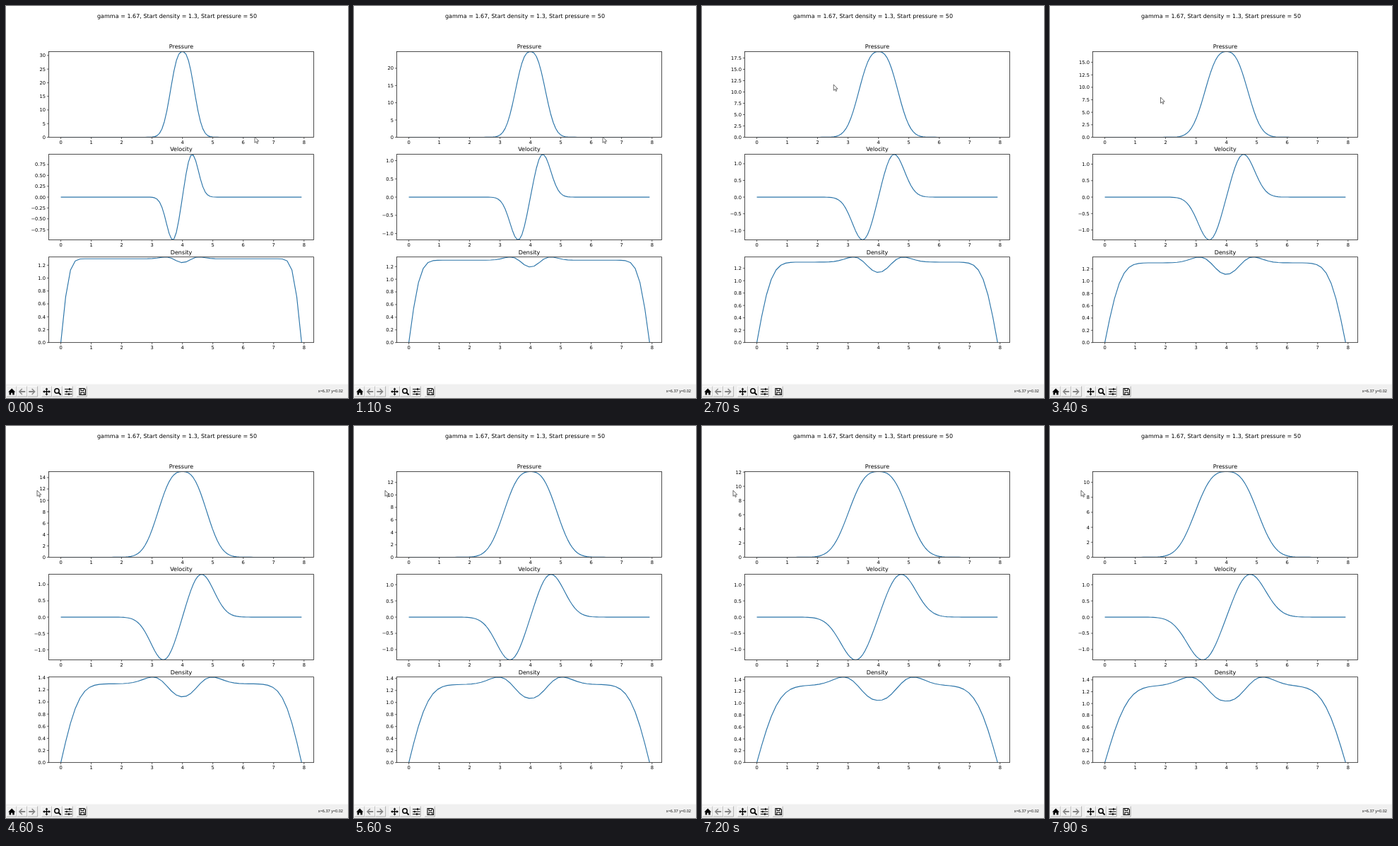
Animation, 484 px wide and 554 px high, one loop 8 s. Source, as an HTML page:

```html
<!DOCTYPE html>
<html lang="en">
<head>
<meta charset="utf-8">
<title>Gas simulation</title>
<style>
  html, body { margin: 0; width: 100%; height: 100%; overflow: hidden; background: #fff; }
  svg { display: block; }
  text { font-family: "DejaVu Sans", sans-serif; font-size: 6.7px; text-rendering: geometricPrecision; }
  .title { font-size: 8.05px; text-anchor: middle; }
  .xt { text-anchor: middle; }
  .yt { text-anchor: end; }
  .frame { fill: none; stroke: #222; stroke-width: .8; }
  .tick { fill: none; stroke: #222; stroke-width: .7; }
  .curve { fill: none; stroke: #2c75a9; stroke-width: 1.15; stroke-linejoin: round; }
  .status { font-family: "Open Sans", sans-serif; font-size: 5.5px; text-anchor: end; }
  .lo { fill: none; stroke: #a0a0a0; stroke-width: .8; }
  .hi { fill: none; stroke: #fff; stroke-width: .8; }
  .line { fill: none; stroke: #000; }
</style>
</head>
<body>
<svg width="484" height="554" viewBox="0 0 484 554">
  <text class="title" x="242" y="17.3">gamma = 1.67, Start density = 1.3, Start pressure = 50</text>
  <g id="plots"></g>
  <g id="bar">
    <rect y="534.5" width="484" height="19.5" fill="#f0f0f0"/>
    <g id="buttons"></g>
    <path d="M3.2 545.4L8.2 540.6L13.2 545.4H11.8V549.6H9.2V546.8H7.2V549.6H4.6V545.4Z"/>
    <g fill="#858585">
      <path id="arrow" d="M17.8 545L22.3 540.4L23.4 541.5L20.8 544.1H27.2V545.9H20.8L23.4 548.5L22.3 549.6Z"/>
      <use href="#arrow" transform="matrix(-1 0 0 1 59.5 0)"/>
    </g>
    <path d="M57.5 539.5L59.5 542H58.2V544.3H60.5V543L63 545L60.5 547V545.7H58.2V548H59.5L57.5 550.5L55.5 548H56.8V545.7H54.5V547L52 545L54.5 543V544.3H56.8V542H55.5Z"/>
    <g class="line">
      <circle cx="72" cy="544" r="3.2" stroke-width="1.5"/>
      <path d="M74.5 546.5L77.6 549.6" stroke-width="2"/>
      <path d="M83 541.5H93.5M83 545H93.5M83 548.5H93.5"/>
      <path d="M90 540.2V542.8M85.8 543.7V546.3M89 547.2V549.8" stroke-width="1.9"/>
      <path d="M104 540.5H110.8L112.5 542.2V549.5H104Z" stroke-width="1.1"/>
      <path d="M106 541V543.5H110V541M106 549V546H110.6V549"/>
    </g>
    <text class="status" x="477" y="546.4">x=6.37 y=0.02</text>
  </g>
  <path id="cursor" d="M0 0V8.3L1.9 6.6L3.2 9.5L4.5 8.9L3.2 6.1H5.8Z" fill="#fff" stroke="#333" stroke-width=".7"/>
</svg>
<script>
const LEFT = 60.5, WIDTH = 375, TOP = 64.5, HEIGHT = 120.95, PITCH = 145.1;
const X0 = 77.6, UNIT = 43.02, END = 7.92, MID = 4;
const NAMES = ["Pressure", "Velocity", "Density"];
const LOOP = 8000, STEP = 100;
const HOLDS = [2, 10, 14, 37, 52, 59];  // ticks on which the simulation stands still
const POINTER = [[11, 352, 185], [17, 216, 93], [31, 156.5, 129], [42, 44, 91]];  // step, x, y

const $ = id => document.getElementById(id);
const px = x => X0 + x * UNIT;
const topOf = name => TOP + PITCH * NAMES.indexOf(name);
const erf = x => Math.tanh(1.12838 * (x + .0895 * x ** 3));

function buildPlots() {
  let out = "";
  for (const name of NAMES) {
    const top = topOf(name), base = top + HEIGHT;
    const box = `x="${LEFT}" y="${top}" width="${WIDTH}" height="${HEIGHT}"`;
    out += `<clipPath id="clip${name}"><rect ${box}/></clipPath>
      <path class="curve" id="line${name}" clip-path="url(#clip${name})"/>
      <g id="ticks${name}"></g>
      <rect class="frame" ${box}/>
      <text class="title" x="248" y="${top - 4.2}">${name}</text>`;
    for (let x = 0; x <= 8; x++)
      out += `<path class="tick" d="M${px(x)} ${base}v2.6"/><text class="xt" x="${px(x)}" y="${base + 9.6}">${x}</text>`;
  }
  $("plots").innerHTML = out;
}

function buildButtons() {
  let out = "";
  for (let i = 0; i < 7; i++) {
    const x = 1 + 14.8 * i + 5.2 * Math.floor(i / 3);
    out += `<path class="hi" d="M${x} 552V537.5H${x + 14}"/><path class="lo" d="M${x} 552H${x + 14}V537.5"/>`;
  }
  $("buttons").innerHTML = out;
}

function tickStep(range) {
  const raw = range / 8, mag = 10 ** Math.floor(Math.log10(raw));
  return [1, 2, 2.5, 5, 10].find(s => s * mag >= raw - 1e-9) * mag;
}

function plot(name, f, lo, hi, count) {
  const base = topOf(name) + HEIGHT, scale = HEIGHT / (hi - lo);
  const py = v => base - (v - lo) * scale;
  let d = "";
  for (let i = 0; i <= count; i++) {
    const x = END * i / count;
    d += (i ? "L" : "M") + px(x).toFixed(2) + " " + py(f(x)).toFixed(2);
  }
  $("line" + name).setAttribute("d", d);

  const step = tickStep(hi - lo);
  const digits = [0, 1, 2].find(n => Math.abs(step - step.toFixed(n)) < 1e-6);
  let out = "";
  for (let i = Math.ceil(lo / step); i * step <= hi; i++) {
    const y = py(i * step), label = (i < 0 ? "\u2212" : "") + Math.abs(i * step).toFixed(digits);
    out += `<path class="tick" d="M${LEFT} ${y}h-2.6"/><text class="yt" x="55.9" y="${y + 2.45}">${label}</text>`;
  }
  $("ticks" + name).innerHTML = out;
}

// The peak sinks while its area shrinks slowly, so it widens.
function drawPressure(k) {
  const max = 31.4 / (1 + .0443 * k) ** .7;
  const width = (26.8 - .031 * k) / max / 1.778, pow = 2.5 + .004 * k;
  plot("Pressure", x => max * Math.exp(-((Math.abs(x - MID) / width) ** pow)), 0, max, 100);
}

// Two opposite crests drift apart.
function drawVelocity(k) {
  const max = 1.32 - .335 * Math.exp(-k / 10.9);
  const crest = Math.sqrt(.102 + .007 * k), pow = 2.5;
  plot("Velocity", x => {
    const u = Math.abs(x - MID) / crest;
    return Math.sign(x - MID) * max * u * Math.exp((1 - u ** pow) / pow);
  }, -max, max, 100);
}

// Gas leaves the middle for two shoulders, and the walls diffuse inwards.
function drawDensity(k) {
  const rest = 1.3, dip = .3 - .24 * Math.exp(-k / 41), pow = 2.05 + .0045 * k;
  const size = Math.sqrt(.3 + .0156 * k) / (1 + pow) ** (1 / pow);
  const wall = Math.sqrt(.09 + .0084 * k);
  const max = rest + dip * pow * Math.exp(-(1 + pow) / pow);
  plot("Density", x => {
    const q = (Math.abs(x - MID) / size) ** pow;
    return rest * erf(x / wall) * erf((END - x) / wall) - dip * (1 - q) * Math.exp(-q / pow);
  }, 0, max, 50);
}

function movePointer(k) {
  let [, x, y] = POINTER[0];
  for (let i = 1; i < POINTER.length; i++) {
    const [a, ax, ay] = POINTER[i - 1], [b, bx, by] = POINTER[i];
    const u = Math.min(1, Math.max(0, (k - a) / (b - a)));
    x += (bx - ax) * u;
    y += (by - ay) * u;
  }
  $("cursor").setAttribute("transform", `translate(${x} ${y})`);
}

buildPlots();
buildButtons();
const start = performance.now();
let shown = -1;
function run() {
  const tick = Math.floor((performance.now() - start) % LOOP / STEP);
  const k = tick - HOLDS.filter(h => h <= tick).length;
  if (k !== shown) {
    shown = k;
    for (const update of [drawPressure, drawVelocity, drawDensity, movePointer]) update(k);
  }
  requestAnimationFrame(run);
}
run();
</script>
</body>
</html>
```
